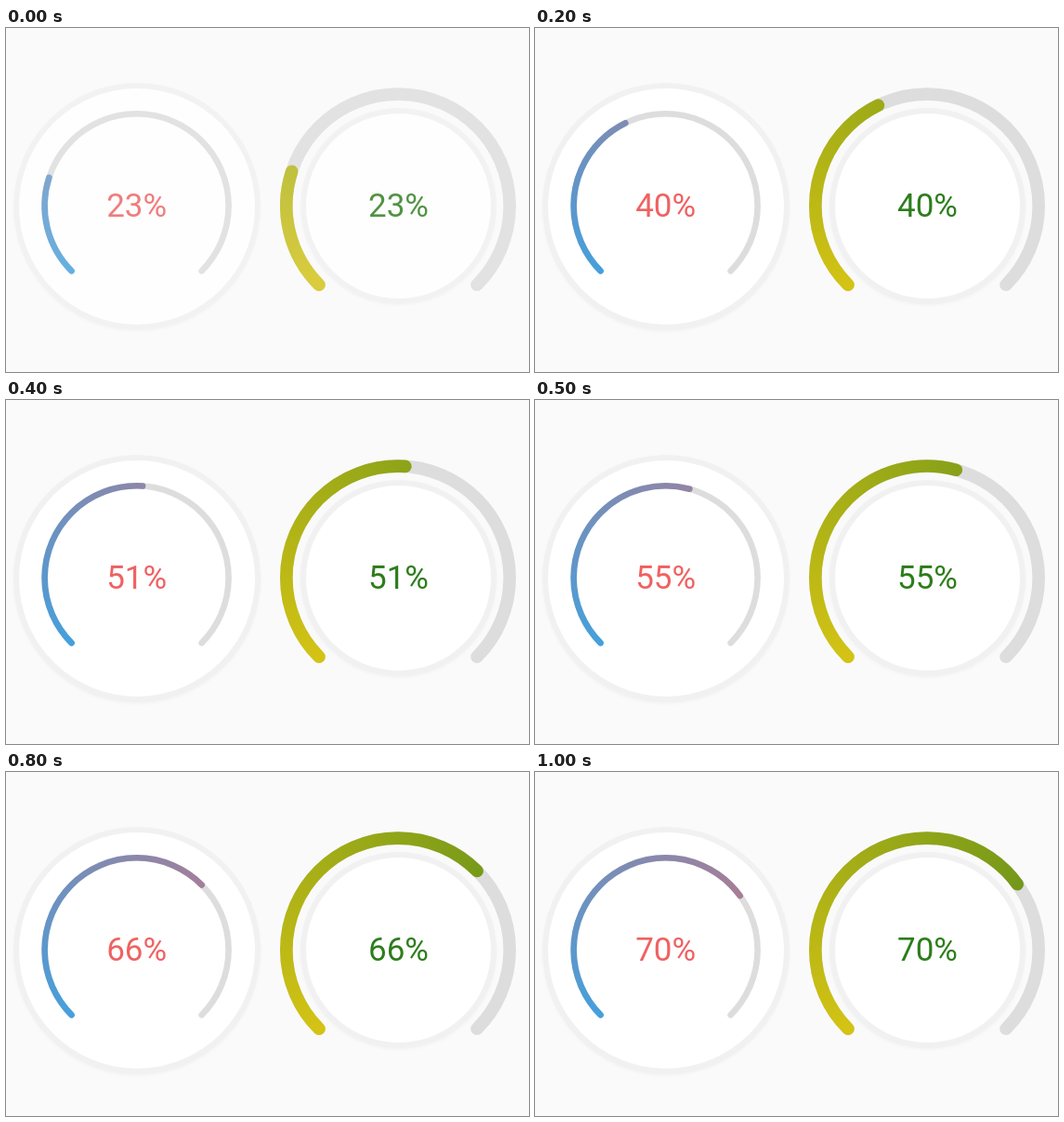
Write an HTML page with a canvas that moves like this. It is 563 px wide and 370 px high and loops after 2 s.

```html
<!DOCTYPE html>
<html lang="en">
<head>
<meta charset="utf-8">
<title>Two radial gauges</title>
<style>
  html, body { margin: 0; width: 100%; height: 100%; overflow: hidden; background: #fafafa; }
  #stage { position: relative; width: 563px; height: 370px; }
  canvas, svg { position: absolute; left: 0; top: 0; width: 563px; height: 370px; }
  .disc {
    position: absolute;
    border-radius: 50%;
    background: #fff;
    box-shadow: 0 0 1px 6px #f1f1f1, 0 2px 4px 5px rgba(0, 0, 0, .045);
  }
  .left { left: 14px; top: 64.5px; width: 254px; height: 254px; }
  .right { left: 323px; top: 92px; width: 199px; height: 199px; }
  text { font: 400 35px Roboto, sans-serif; text-anchor: middle; }
</style>
</head>
<body>
<div id="stage">
  <div class="disc left"></div>
  <div class="disc right"></div>
  <canvas width="563" height="370"></canvas>
  <svg viewBox="0 0 563 370">
    <text x="140.7" y="203" fill="#ef6262"></text>
    <text x="422.5" y="203" fill="#2d7d1c"></text>
  </svg>
</div>
<script>
const LOOP = 2000, STEP = 100;
const VALUES = [23.3, 33.2, 40.4, 46.7, 51.4, 55.6, 61.6, 64.4, 66.7, 68.6, 70];
const START = Math.PI * 0.75, SWEEP = Math.PI * 1.5;

const stage = document.getElementById('stage');
const ctx = document.querySelector('canvas').getContext('2d');
const labels = document.querySelectorAll('text');

function sweepGradient(x, y, from, to) {
  // Begin in the gap at the bottom so the round start cap keeps its colour.
  const gradient = ctx.createConicGradient(Math.PI / 2, x, y);
  gradient.addColorStop(0.125, from);
  gradient.addColorStop(0.875, to);
  return gradient;
}

function makeGauge(x, radius, width, from, to) {
  const y = 191.3;
  return { x, y, radius, width, paint: sweepGradient(x, y, from, to) };
}

const gauges = [
  makeGauge(140.6, 99, 6.6, 'rgb(68,160,221)', 'rgb(210,110,120)'),
  makeGauge(422, 120.2, 13.6, 'rgb(212,195,20)', 'rgb(75,134,28)')
];

function drawArc({ x, y, radius, width }, percent, paint) {
  ctx.beginPath();
  ctx.arc(x, y, radius, START, START + SWEEP * percent / 100);
  ctx.lineWidth = width;
  ctx.lineCap = 'round';
  ctx.strokeStyle = paint;
  ctx.stroke();
}

function render(time) {
  const step = Math.min(Math.floor(time % LOOP / STEP), VALUES.length - 1);
  const value = VALUES[step];
  stage.style.opacity = step === 0 ? 0.82 : 1;
  ctx.clearRect(0, 0, 563, 370);
  gauges.forEach((gauge, i) => {
    drawArc(gauge, 100, '#ddd');
    drawArc(gauge, value, gauge.paint);
    labels[i].textContent = Math.floor(value) + '%';
  });
}

const origin = performance.now();
function tick() {
  render(performance.now() - origin);
  requestAnimationFrame(tick);
}
tick();
</script>
</body>
</html>
```
